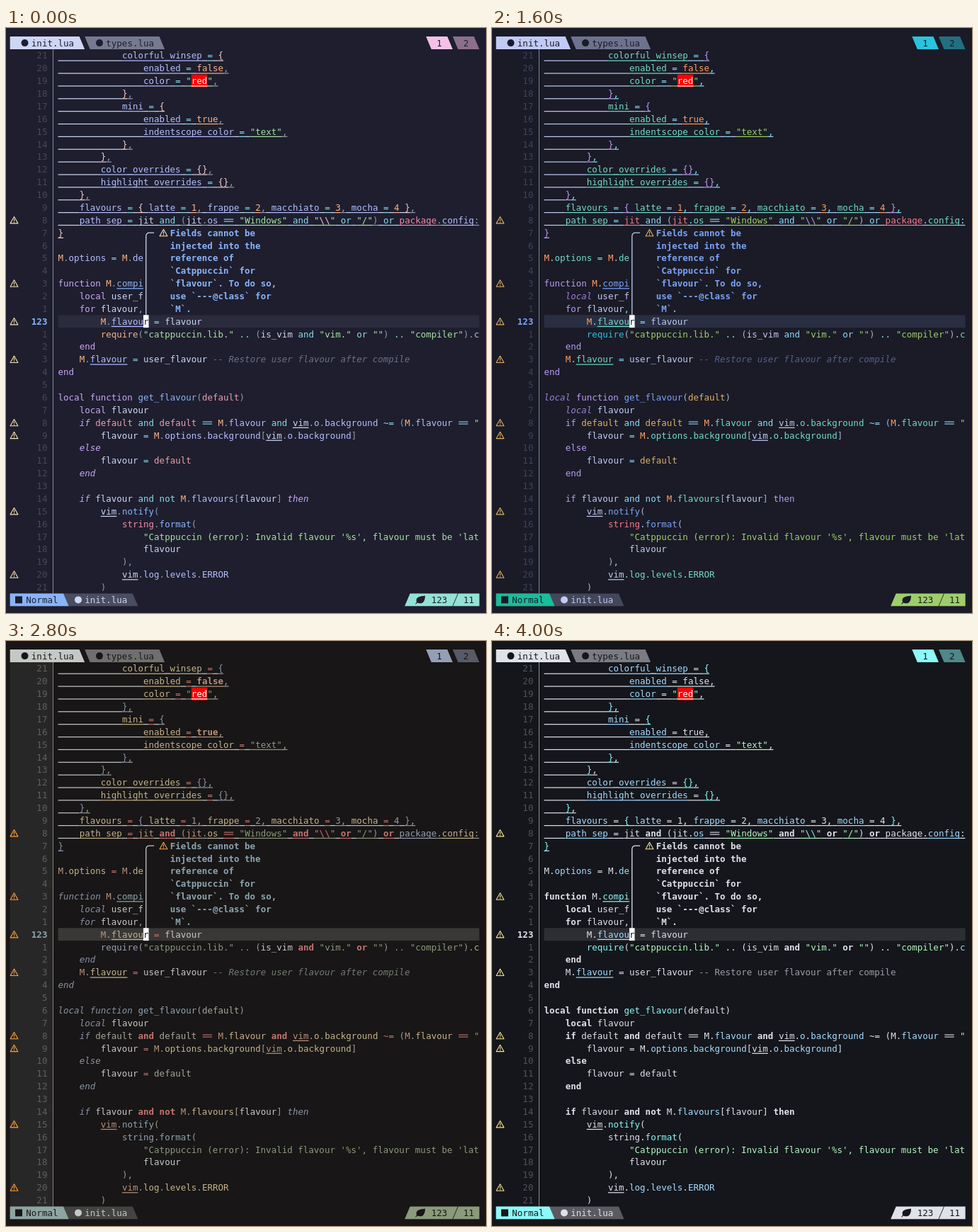
Animation of 678 by 826 pixels, one loop 4400 ms. Source, as an HTML page with a canvas:

```html
<!DOCTYPE html>
<html lang="en">
<head>
<meta charset="utf-8">
<title>Editor colour schemes</title>
<style>
html, body { margin: 0; width: 100%; height: 100%; overflow: hidden; }
canvas { display: block; }
</style>
</head>
<body>
<canvas id="stage" width="678" height="826"></canvas>
<script>
const ctx = document.getElementById('stage').getContext('2d');
const CW = 7.533, LH = 17.87, LEFT = 5.7, TOP = 12.1, RIGHT = 668.6, STEP = 400;
const CURSOR_ROW = 21, TEXT_COL = 9;
const FONT = '12.513px "DejaVu Sans Mono", "Noto Sans Mono", monospace';

const code = String.raw`            colorful_winsep = {
                enabled = false,
                color = "red",
            },
            mini = {
                enabled = true,
                indentscope_color = "text",
            },
        },
        color_overrides = {},
        highlight_overrides = {},
    },
    flavours = { latte = 1, frappe = 2, macchiato = 3, mocha = 4 },
    path_sep = jit and (jit.os == "Windows" and "\\" or "/") or package.config:
}

M.options = M.de

function M.compi
    local user_f
    for flavour,
        M.flavour = flavour
        require("catppuccin.lib." .. (is_vim and "vim." or "") .. "compiler").c
    end
    M.flavour = user_flavour -- Restore user flavour after compile
end

local function get_flavour(default)
    local flavour
    if default and default == M.flavour and vim.o.background ~= (M.flavour == "
        flavour = M.options.background[vim.o.background]
    else
        flavour = default
    end

    if flavour and not M.flavours[flavour] then
        vim.notify(
            string.format(
                "Catppuccin (error): Invalid flavour '%s', flavour must be 'lat
                flavour
            ),
            vim.log.levels.ERROR
        )`.split('\n');

const popup = ['Fields cannot be', 'injected into the', 'reference of', '`Catppuccin` for',
  '`flavour`. To do so,', 'use `---@class` for', '`M`.'];
const warnRows = [13, 18, 21, 24, 29, 30, 36, 41];

// Colour scheme families
const catppuccin = (bg, fg, lavender, sky, peach, green, flamingo, overlay, red, pink, mauve,
  blue, maroon, com, nr, line, teal, warn) => ({
  bg, fg, field: lavender, op: sky, num: peach, bool: peach, str: green, brace: flamingo,
  punct: overlay, mod: red, esc: pink, kw: mauve, fn: blue, req: peach, M: peach, param: maroon,
  com, nr, line, warn, note: blue, mode: blue, end: teal, page: pink,
  style: { cond: 'italic', com: 'italic' }
});

const tokyo = (bg, fg, field, orange, str, bracket, purple, red, loc, fn, req, param,
  com, line, mode, page) => ({
  bg, fg, field, op: '#89ddff', num: orange, bool: orange, str, brace: purple, punct: '#89ddff',
  bracket, mod: red, jit: red, esc: purple, kw: purple, loc, fn, req, M: orange, param,
  com, nr: '#3b4261', line, warn: param, note: fn, mode, end: str, page,
  style: { loc: 'italic', com: 'italic' }
});

const kanagawa = (bg, fg, field, op, orange, num, str, punct, kw, fn, req, param,
  com, nr, gutter, line, mode, warn) => ({
  bg, fg, field, op, num, bool: orange, str, brace: kw, punct, mod: req, jit: orange, vim: orange,
  esc: op, kw, fn, req, M: orange, param, com, nr, gutter, line, warn, note: fn, mode,
  end: str, page: req,
  style: { kw: 'italic', loc: 'italic', cond: 'italic', com: 'italic', and: 'bold', bool: 'bold' }
});

const mocha = catppuccin('#1e1e2e', '#cdd6f4', '#b4befe', '#89dceb', '#fab387', '#a6e3a1', '#f2cdcd',
  '#9399b2', '#f38ba8', '#f5c2e7', '#cba6f7', '#89b4fa', '#eba0ac', '#6c7086', '#45475a', '#2a2b3c',
  '#94e2d5', '#f9e2af');
const macchiato = catppuccin('#24273a', '#cad3f5', '#b7bdf8', '#91d7e3', '#f5a97f', '#a6da95', '#f0c6c6',
  '#939ab7', '#ed8796', '#f5bde6', '#c6a0f6', '#8aadf4', '#ee99a0', '#6e738d', '#494d64', '#303347',
  '#8bd5ca', '#eed49f');
const frappe = catppuccin('#303446', '#c6d0f5', '#babbf1', '#99d1db', '#ef9f76', '#a6d189', '#eebebe',
  '#949cbb', '#e78284', '#f4b8e4', '#ca9ee6', '#8caaee', '#ea999c', '#737994', '#51576d', '#3b3f52',
  '#81c8be', '#e5c890');
const moon = tokyo('#222436', '#c8d3f5', '#4fd6be', '#ff966c', '#c3e88d', '#828bb8', '#c099ff', '#ff757f',
  '#fca7ea', '#82aaff', '#65bcff', '#ffc777', '#636da6', '#2f334d', '#4fd6be', '#65bcff');
const storm = tokyo('#24283b', '#c0caf5', '#73daca', '#ff9e64', '#9ece6a', '#a9b1d6', '#bb9af7', '#f7768e',
  '#9d7cd8', '#7aa2f7', '#2ac3de', '#e0af68', '#565f89', '#292e42', '#1abc9c', '#2ac3de');
const night = { ...storm, bg: '#1a1b26' };
const wave = kanagawa('#1f1f28', '#dcd7ba', '#e6c384', '#c0a36e', '#ffa066', '#d27e99', '#98bb6c', '#9cabca',
  '#957fb8', '#7e9cd8', '#7fb4ca', '#b8b4d0', '#727169', '#54546d', '#2a2a37', '#363646', '#6a9589', '#ff9e3b');
const dragon = kanagawa('#181616', '#c5c9c5', '#c4b28a', '#c4746e', '#b6927b', '#a292a3', '#8a9a7b', '#9e9b93',
  '#8992a7', '#8ba4b0', '#949fb5', '#a6a69c', '#737c73', '#625e5a', '#282727', '#393836', '#8ea4a2', '#ff9e3b');
const plain = {
  bg: '#14161b', fg: '#e0e2ea', field: '#a6dbff', str: '#b3f6c0', brace: '#8cf8f7', esc: '#8cf8f7',
  fn: '#8cf8f7', req: '#8cf8f7', com: '#9b9ea4', nr: '#4f5258', line: '#2c2e33', warn: '#fce094',
  note: '#e0e2ea', mode: '#8cf8f7', end: '#e0e2ea', page: '#8cf8f7', file: '#595b60',
  style: { kw: 'bold', loc: 'bold', cond: 'bold', and: 'bold' }
};
const muted = {
  bg: '#1c1c1c', fg: '#c6c6c6', field: '#87afd7', op: '#bcbcbc', num: '#d7875f', bool: '#d7875f',
  str: '#87af87', brace: '#87afaf', punct: '#9e9e9e', esc: '#af875f', kw: '#af87af', fn: '#87afaf',
  req: '#87afaf', com: '#767676', nr: '#585858', line: '#303030', warn: '#d7af87', note: '#87afd7',
  mode: '#87afaf', end: '#87af87', page: '#87afd7', style: {}
};
const themes = [mocha, macchiato, frappe, moon, night, storm, wave, dragon, wave, muted, plain];

const parents = { loc: 'kw', cond: 'kw', and: 'op', bracket: 'punct' };
const words = {
  local: 'loc', function: 'kw', for: 'kw', end: 'kw', if: 'cond', else: 'cond', then: 'cond',
  and: 'and', or: 'and', not: 'and', true: 'bool', false: 'bool', M: 'M', jit: 'jit', vim: 'vim',
  require: 'req', string: 'mod', package: 'mod', compi: 'fn', default: 'param'
};

let t;
const X = col => LEFT + col * CW;
const Y = row => TOP + (row + 1) * LH;
const color = kind => t[kind] || (parents[kind] && color(parents[kind])) || t.fg;
const rgb = hex => [1, 3, 5].map(i => parseInt(hex.slice(i, i + 2), 16));
const mix = (a, k) => {
  const b = rgb(t.bg);
  return `rgb(${rgb(a).map((v, i) => Math.round(b[i] + (v - b[i]) * k))})`;
};

function rect(x, y, w, h, fill) {
  ctx.fillStyle = fill;
  ctx.fillRect(x, y, w, h);
}

function text(str, col, row, fill, style = '') {
  ctx.font = `${style} ${FONT}`;
  ctx.fillStyle = fill;
  ctx.fillText(str, X(col), Y(row) + 13.5);
}

function underline(col, row, len, fill) {
  rect(X(col), Y(row) + 15.6, len * CW, 1.2, fill);
}

// Bar segment; dl and dr shift the lower corners sideways
function slab(c0, c1, row, fill, dl, dr) {
  const y = Y(row), b = y + LH;
  ctx.fillStyle = fill;
  ctx.beginPath();
  ctx.moveTo(X(c0), y);
  ctx.lineTo(X(c1), y);
  ctx.lineTo(X(c1 + dr), b);
  ctx.lineTo(X(c0 + dl), b);
  ctx.fill();
}

function dot(x, row, fill) {
  ctx.fillStyle = fill;
  ctx.beginPath();
  ctx.arc(x, Y(row) + 9, 5, 0, 7);
  ctx.fill();
}

function stroke(path, fill, width) {
  ctx.strokeStyle = fill;
  ctx.lineWidth = width;
  ctx.lineJoin = 'round';
  ctx.stroke(new Path2D(path));
}

function warning(x, row) {
  const y = Y(row) + 9;
  stroke(`M${x} ${y - 4.8}l5.4 9.4h-10.8z`, t.warn, 1.1);
  stroke(`M${x} ${y - 1.8}v3.2m0 .8v1.3`, t.warn, 1.1);
}

function kindOf(tok, row, before, after) {
  if (tok.startsWith('--')) return 'com';
  if (tok[0] === '"') return 'str';
  if (/^\d/.test(tok)) return 'num';
  if (/^\w/.test(tok)) {
    if (tok === 'end' && row === 33) return 'cond';
    if (words[tok]) return words[tok];
    if (after[0] === '(') return 'fn';
    return before.endsWith('.') || row < 15 ? 'field' : 'fg';
  }
  if (/^[{}]/.test(tok)) return 'brace';
  if (/^[()[\]]/.test(tok)) return 'bracket';
  return /^(==|~=|=|\.\.)$/.test(tok) ? 'op' : tok.trim() ? 'punct' : 'fg';
}

function codeLine(line, row) {
  for (const m of line.matchAll(/--.*|"[^"]*"?|\w+|==|~=|\.\.|=| +|\S/g)) {
    const tok = m[0], before = line.slice(0, m.index), after = line.slice(m.index + tok.length);
    const kind = kindOf(tok, row, before, after), fill = color(kind);
    let col = TEXT_COL + m.index;
    if (row < 15 || kind === 'vim' || tok === 'compi' ||
        (before.endsWith('M.') && /^ = /.test(after) && tok === 'flavour')) {
      underline(col, row, tok.length, fill);
    }
    if (tok === '==') {
      for (const dy of [7.3, 10.3]) rect(X(col) + 0.8, Y(row) + dy, 2 * CW - 1.6, 1.1, fill);
      continue;
    }
    for (const part of tok.split(/(\\+)/)) {
      text(part, col, row, part[0] === '\\' ? color('esc') : fill, t.style[kind]);
      col += part.length;
    }
  }
}

function tabs() {
  slab(0, 13, -1, t.fg, 0, 1);
  slab(14, 28, -1, mix(t.fg, 0.5), 1, 1);
  dot(26.5, -1, t.bg);
  dot(132, -1, t.bg);
  text('init.lua', 4, -1, t.bg);
  text('types.lua', 18, -1, t.bg);
  slab(78, 82, -1, t.page, 1, 1);
  slab(83, 87, -1, mix(t.page, 0.5), 1, 1);
  text('1', 80, -1, t.bg);
  text('2', 85, -1, t.bg);
}

function status() {
  const row = code.length, y = Y(row);
  slab(0, 23, row, t.file || mix(t.fg, 0.25), 0, 1);
  slab(0, 10, row, t.mode, 0, 1);
  rect(13, y + 4, 10, 10, t.bg);
  text('Normal', 3, row, t.bg);
  dot(102, row, t.fg);
  text('init.lua', 14, row, t.fg);
  slab(75, 88, row, t.end, -1, 0);
  ctx.fillStyle = t.bg;
  ctx.fill(new Path2D(`M578 ${y + 15}l2 -3c-2 -7 4 -8 12 -9c0 9 -4 13 -11 10l-2 2z`));
  text('123', 79, row, t.bg);
  stroke(`M${X(83)} ${y + LH}L${X(84)} ${y}`, t.bg, 0.9);
  text('11', 85, row, t.bg);
}

function note() {
  const x = X(TEXT_COL + 16), y = Y(14), mid = x + CW / 2;
  rect(x, y, RIGHT - x, popup.length * LH, t.bg);
  stroke(`M${x + 2 * CW} ${y + 9}H${mid + 5}Q${mid} ${y + 9} ${mid} ${y + 14}V${Y(CURSOR_ROW)}`, t.fg, 1.3);
  warning(222.5, 14);
  popup.forEach((line, i) => text(line, 30, 14 + i, t.note, 'bold'));
}

function draw(theme) {
  t = theme;
  const left = X(TEXT_COL), cur = Y(CURSOR_ROW);
  rect(0, 0, 678, 826, t.bg);
  if (t.gutter) rect(LEFT, Y(0), 60.5, code.length * LH, t.gutter);
  rect(left, cur, RIGHT - left, LH, t.line);
  rect(66, Y(0), 1, code.length * LH, mix(t.fg, 0.6));

  ctx.save();
  ctx.beginPath();
  ctx.rect(0, 0, RIGHT, 826);
  ctx.clip();
  code.forEach((line, row) => {
    const here = row === CURSOR_ROW;
    const nr = here ? '123' : String(Math.abs(row - CURSOR_ROW));
    text(nr, 7 - nr.length, row, here ? t.note : t.nr, here ? 'bold' : '');
    codeLine(line, row);
  });
  ctx.restore();

  rect(X(34), Y(2), 3 * CW, LH, '#f00');
  underline(34, 2, 3, '#fff');
  text('red', 34, 2, '#fff');
  warnRows.forEach(row => warning(11.5, row));
  note();
  rect(X(25), cur, CW, LH, '#fff');
  text('r', 25, CURSOR_ROW, t.bg);
  tabs();
  status();
}

let shown = -1;
function tick() {
  const i = Math.floor(performance.now() / STEP) % themes.length;
  if (i !== shown) draw(themes[shown = i]);
  requestAnimationFrame(tick);
}
tick();
</script>
</body>
</html>
```
